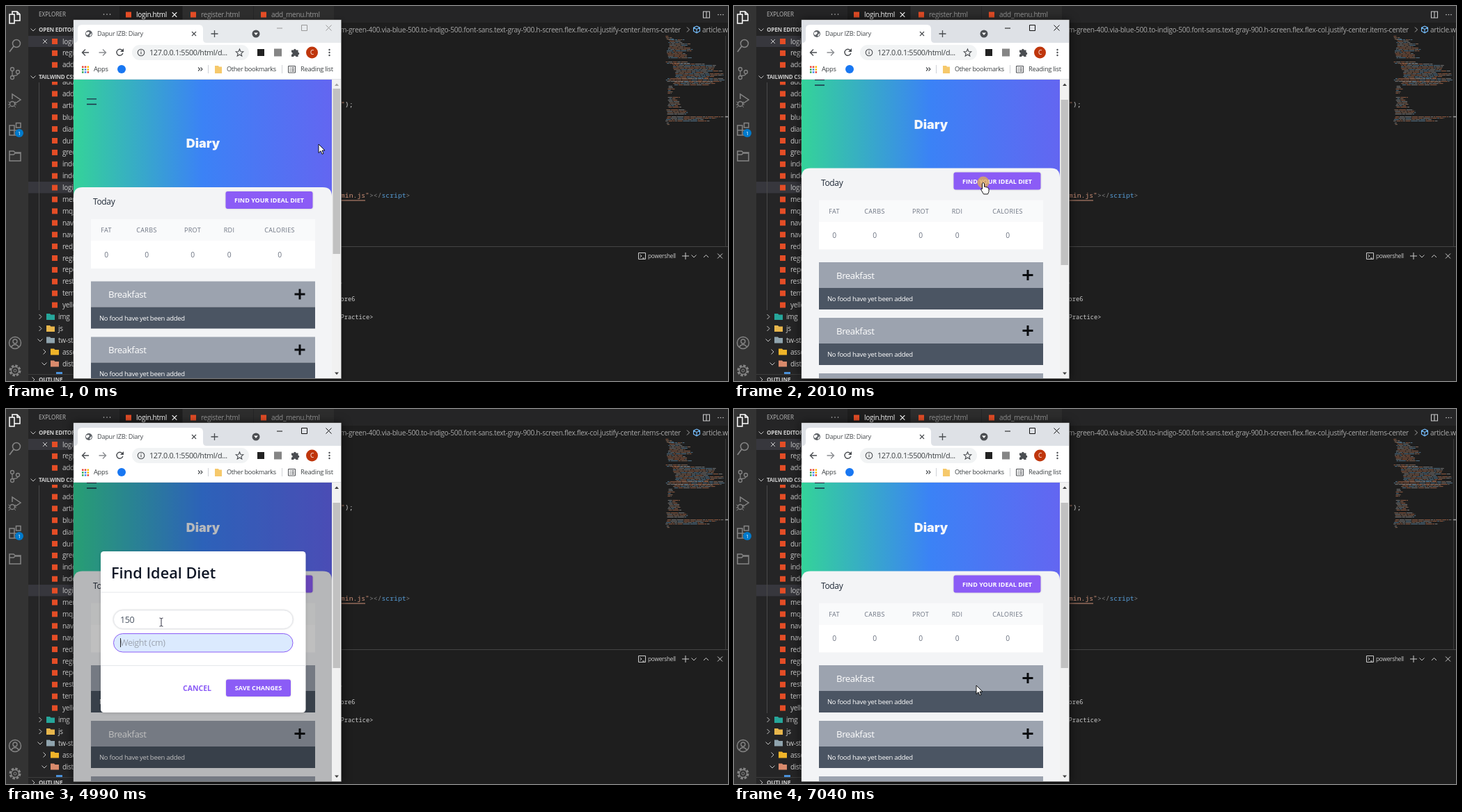
Write an HTML page that moves like this. It is 1037 px wide and 540 px high and loops after 8000 ms.

```html
<!DOCTYPE html>
<html lang="en">
<head>
<meta charset="utf-8">
<title>Diet diary demo</title>
<style>
  html, body { margin: 0; width: 100%; height: 100%; overflow: hidden; background: #1e1e1e; }
  svg { display: block; }
  text { font-family: "Open Sans", "Noto Sans", sans-serif; letter-spacing: -.03em; white-space: pre; }
  .wide { letter-spacing: 0; }
  .head { letter-spacing: .35px; font-weight: 500; }
  .mono { font-family: "Noto Sans Mono", "DejaVu Sans Mono", monospace; letter-spacing: 0; }
  .logo { font-family: Inter, "Open Sans", sans-serif; letter-spacing: 0; font-weight: 900; }
  .lift { filter: drop-shadow(0 .5px 1px rgba(0,0,0,.18)); }
  .modal { filter: drop-shadow(0 1px 2px rgba(0,0,0,.15)); }
</style>
</head>
<body>
<svg id="stage" width="1037" height="540" viewBox="0 0 1037 540">
  <defs>
    <linearGradient id="sky">
      <stop offset="0" stop-color="#34d399"/>
      <stop offset=".5" stop-color="#3b82f6"/>
      <stop offset="1" stop-color="#6366f1"/>
    </linearGradient>
    <clipPath id="view"><rect x="97" y="106" width="371" height="430"/></clipPath>
  </defs>
  <g id="editor"></g>
  <g id="frame"></g>
  <g id="page" clip-path="url(#view)"></g>
  <g id="bar"></g>
  <g id="pointer"></g>
</svg>
<script>
const $ = id => document.getElementById(id);

// Basic shapes; text is placed by the middle of its capitals.
const text = (x, y, s, size, fill, attrs = '') =>
  `<text x="${x}" y="${y + size * .355}" font-size="${size}" fill="${fill}" ${attrs}>${
    s.replace(/</g, '&lt;').replace(/>/g, '&gt;')}</text>`;
const box = (x, y, w, h, fill, attrs = '') =>
  `<rect x="${x}" y="${y}" width="${w}" height="${h}" fill="${fill}" ${attrs}/>`;
const dot = (x, y, r, fill, attrs = '') => `<circle cx="${x}" cy="${y}" r="${r}" fill="${fill}" ${attrs}/>`;
const line = (d, color, width = 1, attrs = '') =>
  `<path d="${d}" fill="none" stroke="${color}" stroke-width="${width}" ${attrs}/>`;
const shape = (d, fill, attrs = '') => `<path d="${d}" fill="${fill}" ${attrs}/>`;
const chevron = (x, y, open, color = '#c5c5c5') =>
  line(open ? `M${x - 3.5} ${y - 1.5}l3.5 3.5 3.5-3.5` : `M${x - 1.5} ${y - 3.5}l3.5 3.5-3.5 3.5`, color);
const cross = (x, y, r, color, width = 1) =>
  line(`M${x - r} ${y - r}l${2 * r} ${2 * r}m0 ${-2 * r}l${-2 * r} ${2 * r}`, color, width);

function rng(seed) {
  return () => (seed = (seed * 16807) % 2147483647) / 2147483647;
}

function activityBar() {
  const g = '#858585', w = '#ffffff';
  let s = box(0, 0, 32, 540, '#333333');
  s += line('M9 12v-4h7l4 4v9h-8M16 8v4h4M5 12h7v13H5z', w, 1.5);
  s += dot(15, 54, 5.5, 'none', `stroke="${g}" stroke-width="1.5"`) + line('M11 58l-6 8', g, 1.7);
  s += [[9, 91], [9, 103], [17, 95]].map(([x, y]) => dot(x, y, 2.5, 'none', `stroke="${g}" stroke-width="1.3"`)).join('');
  s += line('M9 93.500v7M17 97.500q0 3-8 3', g, 1.3);
  s += line('M9 134v-7l12 8-9 6', g, 1.5) + dot(9, 141, 3.5, 'none', `stroke="${g}" stroke-width="1.3"`)
    + line('M3.500 138l2.500 1.500M3 142h2.500M3.500 146l2.500-1.500M12 139l2-1M12.500 142h2.500M12 144l2 2', g);
  s += line('M5 172h7v14H5zM5 179h14v7H5M14.500 168.500h6.500v6.500h-6.500z', g, 1.5);
  s += dot(19, 183, 6, '#007acc') + text(19, 183, '1', 7.5, w, 'text-anchor="middle"');
  s += line('M5 223v-14h6l2 2h8v12zM5 214h6l2-2h8', g, 1.5);
  s += dot(13, 485, 8.5, 'none', `stroke="${g}" stroke-width="1.4"`)
    + dot(13, 483, 3, 'none', `stroke="${g}" stroke-width="1.4"`) + line('M7.500 491q5.500-7 11 0', g, 1.4);
  s += dot(13, 525, 7, 'none', `stroke="${g}" stroke-width="3" stroke-dasharray="3.5 2"`)
    + dot(13, 525, 5.5, 'none', `stroke="${g}" stroke-width="1.3"`) + dot(13, 525, 2, 'none', `stroke="${g}"`);
  return s;
}

const fileMark = (x, y) => box(x - 4, y - 4, 8, 8, '#e44d26');
const folder = (x, y, color) => shape(`M${x - 6} ${y - 4.5}h5l1.500 1.500h5.500v7.500h-12z`, color);

function sidebar() {
  const c = '#cccccc';
  let s = box(32, 0, 131, 540, '#252526');
  s += text(47, 12, 'EXPLORER', 8.1, '#bbbbbb', 'class="wide"');
  s += [140.5, 145, 149.500].map(x => dot(x, 12, .8, c)).join('');
  s += box(32, 43, 131, 16, '#37373d') + box(32, 253, 131, 16.5, '#37373d');
  s += chevron(39, 34, true) + text(47, 34, 'OPEN EDITORS', 8.2, c, 'font-weight="700"');
  s += cross(56, 51, 3, c);
  ['login.html', 'register.html', 'add_menu.html'].forEach((name, i) => {
    const y = 51 + i * 16.9;
    s += fileMark(70, y) + text(81, y, name, 10, c);
  });
  s += line('M47.500 110V438', '#4a4a4a');
  ('add_food add_menu article blue diary dummy green index index_2 login menu mq_test '
    + 'navbar navbar_2 red_page register report rest template yellow').split(' ').forEach((name, i) => {
    const y = 109.500 + i * 16.9;
    s += fileMark(70, y) + text(81, y, name, 10, c);
  });
  s += box(32, 94, 131, 15, '#252526') + chevron(39, 102, true)
    + text(47, 102, 'TAILWIND CSS', 8, c, 'font-weight="700"');
  [[64, 447.5, 'img', 0, '#26a69a'], [64, 464.5, 'js', 0, '#e8b64c'], [64, 481, 'tw-starter', 1, '#90a4ae'],
    [70, 498, 'assets', 0, '#f0b429'], [70, 515, 'dist', 1, '#d98a6c']].forEach(([x, y, name, open, color]) => {
    s += chevron(x - 15, y, open) + folder(x, y, color) + text(x + 11, y, name, 10, c);
  });
  s += box(72, 527, 9, 4, '#4a90d9') + box(32, 530, 131, 10, '#252526') + line('M32 530.500H163', '#3c3c3c');
  return s + chevron(39, 538, false) + text(47, 538.5, 'OUTLINE', 8.2, c, 'font-weight="700"');
}

function minimap() {
  const rand = rng(77), colors = ['#8a8a8a', '#a8694a', '#5f86a0', '#9a7660'];
  const blocks = [
    [43, 48, 947, 5, 12], [48, 60, 951, 15, 32], [60, 76, 949, 22, 38], [80, 83, 947, 30, 50],
    [83, 93, 957, 45, 72], [93, 104, 960, 48, 72], [104, 109, 947, 75, 86], [109, 114, 958, 45, 70],
    [115, 126, 949, 5, 12], [131, 147, 950, 8, 20], [149, 156, 947, 28, 46], [159, 166, 947, 50, 86], [168, 172, 947, 3, 8]];
  let s = '';
  for (const [top, end, x, low, high] of blocks)
    for (let y = top; y < end; y += 2) {
      const stop = Math.min(1032, x + low + rand() * (high - low));
      for (let p = x + rand() * 3; p < stop;) {
        const w = Math.min(stop - p, 2 + rand() * 8);
        s += box(p.toFixed(1), y, w.toFixed(1), 1.1, colors[rand() * 4 | 0], 'opacity=".75"');
        p += w + .8;
      }
    }
  return s;
}

function codeArea() {
  const c = '#cccccc', mono = 'class="mono"', size = 9.75, step = 5.85;
  let s = box(163, 0, 874, 24, '#252526') + box(163, 0, 90, 25, '#1e1e1e')
    + box(254, 0, 101, 24, '#2d2d2d') + box(356, 0, 115, 24, '#2d2d2d');
  [[176, 'login.html', '#ffffff'], [269, 'register.html', '#969696'], [370, 'add_menu.html', '#969696']]
    .forEach(([x, name, color]) => s += fileMark(x, 12.5) + text(x + 11, 12.5, name, 10, color));
  s += cross(242, 12.5, 3.3, '#ffffff', 1.2);
  s += line('M1001.500 8h9v9h-9zM1006 8v9', c, 1.1) + [1023, 1026.5, 1030].map(x => dot(x, 12.5, .8, c)).join('');
  s += text(480, 34, 'm-green-400.via-blue-500.to-indigo-500.font-sans.text-gray-900.h-screen.flex.flex-col.justify-center.items-center',
    10.15, '#a9a9a9');
  s += chevron(979.5, 34, false, '#a9a9a9')
    + line('M992 29l4.500 2.200v5l-4.500 2.600-4.500-2.600v-5zM987.500 31.200l4.500 2.300 4.500-2.300M992 33.500v5', '#75beff', 1.1)
    + text(1000, 34, 'article.w-full', 10.15, '#a9a9a9');
  s += text(481, 142, '"', size, '#ce9178', mono) + text(481 + step, 142, ');', size, '#d4d4d4', mono);
  const run = (n, str, color) => text(481 + n * step, 273, str, size, color, mono);
  s += run(0, 'min.js', '#ce9178') + run(6, '"', '#ce9178') + run(7, '></', '#808080')
    + run(10, 'script', '#569cd6') + run(16, '>', '#808080') + line('M481 280H516', '#ce9178');
  s += minimap() + line('M1033.500 43V346', '#3a3a3a') + line('M1033 159.500h4', '#a0a0a0', 1.5);
  s += line('M163 346.500H1037', '#454545');
  s += line('M908.500 355.500h10v9h-10zM910.500 358l2.500 2-2.500 2M914 363h3', c) + text(922, 360, 'powershell', 8.3, c)
    + line('M971 360h10M976 355v10', c) + chevron(988, 360, true) + line('M1002 362l3.500-3.500 3.500 3.500', c) + cross(1025.5, 360, 3.5, c);
  s += dot(481.5, 399, .8, c) + text(480.5, 422, 'ore6', 8.7, c, mono) + text(480.5, 448, 'Practice>', 8.7, c, mono);
  return s;
}

function browserFrame(active) {
  const dark = '#4a4d51', ctl = active ? '#111111' : '#999999';
  let s = box(97, 20, 384.5, 516.5, '#ffffff', `stroke="#777777" stroke-width=".6" style="filter:drop-shadow(0 1px ${
    active ? 7 : 3}px rgba(0,0,0,${active ? .65 : .4}))"`);
  s += box(97, 20.5, 384, 32.5, active ? '#dee1e6' : '#e7eaed');
  s += shape('M98 53q5 0 5-5V33q0-6 6-6H277q6 0 6 6V48q0 5 5 5z', '#ffffff');
  s += dot(119, 40, 5, '#5f6368') + shape('M115 38l4-1 1 2-3 3-2-1zM120 42l3-3 0 2-2 3z', '#ffffff');
  s += text(131, 40, 'Dapur IZB: Diary', 9.2, '#45494d') + cross(270, 40, 3, dark, 1.2);
  s += line('M294.500 40h10M299.500 35v10', dark, 1.3);
  s += dot(359, 40, 5.5, '#4a4d51') + shape('M356 38.500h6l-3 3.500z', '#ffffff');
  s += line('M389 32h8', ctl) + line('M424.500 27.500h8v8h-8z', ctl) + cross(463.5, 31.5, 4, ctl);

  s += line('M119 67h-9M114 62.500l-4.500 4.500 4.500 4.500', dark, 1.4)
    + line('M133.500 67h9M139 62.500l4.500 4.500-4.500 4.500', '#8a8d91', 1.4)
    + line('M167 64a4.500 4.500 0 1 0 .8 4', dark, 1.4) + shape('M169 61v5h-5z', dark);
  s += box(181, 56, 168, 22, '#f1f3f4', 'rx="11"');
  s += dot(194, 67, 4.8, 'none', `stroke="${dark}" stroke-width="1.1"`) + line('M194 66v3.500M194 63.700v1.300', dark, 1.1);
  s += text(206, 67, '127.0.0.1:5500/html/d...', 10.8, '#3c4043');
  s += line('M335.500 62l1.500 3.500 3.800.3-2.900 2.500.9 3.700-3.300-2-3.300 2 .9-3.700-2.900-2.500 3.800-.3z', dark, 1.1);
  s += box(361, 62, 10, 10, '#222222') + box(385, 61.5, 11, 11, '#858585');
  s += shape('M410 63.500h3.200a1.700 1.700 0 1 1 3.400 0h3v3.300a1.700 1.700 0 1 1 0 3.400v2.800h-3.200a1.600 1.600 0 1 0-3.200 0h-3.200v-3.200a1.600 1.600 0 1 0 0-3.200z', dark);
  s += dot(439.5, 67, 8.5, '#bf360c') + text(439.5, 67, 'C', 8.5, '#ffffff', 'text-anchor="middle"');
  s += [63, 67, 71].map(y => dot(464.5, y, 1.2, dark)).join('');

  ['#ea4335', '#ea4335', '#fbbc04', '#34a853', '#4285f4', '#fbbc04', '#34a853', '#4285f4', '#ea4335']
    .forEach((color, i) => s += box(109 + i % 3 * 3.8, 86.5 + (i / 3 | 0) * 3.8, 2.5, 2.5, color));
  s += text(126, 91, 'Apps', 9.3, '#3c4043') + dot(166, 91, 6, '#1877f2');
  s += line('M276 88.500l2.500 2.500-2.500 2.500M279.500 88.500l2.500 2.500-2.500 2.500', dark, 1.1) + line('M290.500 85v12', '#d0d3d7');
  s += shape('M300 86h5l1 1.500h4V97h-10z', '#f6c96b') + text(317, 91, 'Other bookmarks', 9.15, '#3c4043');
  s += line('M396.500 85v12', '#d0d3d7') + line('M405.500 86.500h10v9.500h-10zM407.500 89h1.500m1 0h4M407.500 91.300h1.500m1 0h4M407.500 93.600h1.500m1 0h4', dark);
  return s + text(423, 91, 'Reading list', 9.35, '#3c4043') + line('M97 105.500H481', '#dfe1e5');
}

function meal(y) {
  return box(122, y, 322, 37, '#9ca3af') + box(122, y + 37, 322, 31, '#4b5563')
    + text(147, y + 19, 'Breakfast', 13.2, '#ffffff')
    + line(`M414.500 ${y + 18.5}h15M422 ${y + 11}v15`, '#0b0d10', 3)
    + text(134, y + 53, 'No food have yet been added', 9.48, '#ffffff');
}

function diary(scroll) {
  let s = box(97, 90, 371, 200, 'url(#sky)');
  s += line('M116 133.800h14M116 141.500h14', '#1f2f45', 1.3);
  s += text(283, 198, 'Diary', 18, '#f3f6fb', 'class="logo" text-anchor="middle"');
  s += shape('M97 600V274q0-13 13-13H455q13 0 13 13V600z', '#f3f4f6');
  s += text(125, 282, 'Today', 12, '#1f2937');
  s += box(315.5, 267, 125, 25, '#8b5cf6', 'rx="3" class="lift"');
  s += text(378, 280, 'FIND YOUR IDEAL DIET', 9, '#ffffff', 'class="wide" font-weight="700" text-anchor="middle"');
  s += box(122, 307, 322, 31, '#f9fafb') + box(122, 338, 322, 40, '#ffffff');
  [['FAT', 144], ['CARBS', 202], ['PROT', 268], ['RDI', 320.5], ['CALORIES', 393]].forEach(([name, x]) => {
    s += text(x, 323, name, 9, '#6b7280', 'class="head" text-anchor="middle"');
    s += text(x, 358, '0', 10.3, '#6b7280', 'text-anchor="middle"');
  });
  s += [396.5, 476.5, 556.5].map(meal).join('');
  return `<g transform="translate(0 ${-scroll})">${s}</g>`;
}

function field(y, value, color, focus) {
  return box(154.5, y + .5, 257.5, 26.5, focus ? '#dbeafe' : '#ffffff',
    `rx="13.2" stroke="${focus ? '#8b5cf6' : '#e5e7eb'}" class="${focus ? '' : 'lift'}"`)
    + text(164, y + 14, value, 12.5, color) + (focus ? line(`M164.500 ${y + 7}v13`, '#222222') : '');
}

const HINT = '#9ca3af';
function dialog({ height, weight, focus, typed }) {
  let s = box(97, 106, 371, 430, '#000000', 'opacity=".25"');
  s += box(136, 205, 294.5, 232, '#ffffff', 'rx="4.5" class="modal"');
  s += text(151, 236, 'Find Ideal Diet', 21.7, '#111827', 'class="wide" font-weight="600"');
  s += line('M136 264H430.500M136 369.500H430.500', '#e5e7eb');
  s += field(289.3, height, typed ? '#4b5563' : HINT, focus === 'height');
  s += field(323, weight, weight === '50' ? '#b0b4ba' : HINT, focus === 'weight');
  if (focus === 'height')
    s += box(153.5, 318, 259, 39.5, '#ffffff', 'rx="2" class="lift"') + text(163, 338, 'asdaddasds', 10.1, '#1f2937');
  s += text(274.5, 402, 'CANCEL', 10.5, '#8b5cf6', 'class="wide" font-weight="700" text-anchor="middle"');
  s += box(316, 389.5, 93, 24.5, '#8b5cf6', 'rx="3" class="lift"');
  return s + text(362.5, 402, 'SAVE CHANGES', 9.1, '#ffffff', 'class="wide" font-weight="700" text-anchor="middle"');
}

function scrollbar(scroll) {
  const top = scroll ? 135 : 119;
  return box(468, 106, 13, 430, '#f1f1f1') + box(469.5, top, 10.5, 238, '#c1c1c1')
    + shape('M472 115h6l-3-3.500z', scroll ? '#404040' : '#a3a3a3') + shape('M472 527.500h6l-3 3.500z', '#404040');
}

const pointers = {
  arrow: () => shape('M0 0v12.500l3-2.800 2 4.600 2-.9-2-4.400h4z', '#ffffff', 'stroke="#000000" stroke-width=".9"'),
  hand: () => dot(0, 0, 8.5, '#e3b14f', 'opacity=".75"')
    + shape('M-1.500 1.500q1.500-2 3 0v5l1-.5 1.500 1 1.500-.3 1 1.200q1.500 0 1.500 1.500v4l-1.500 3.500h-6l-3.500-6q-1-2.500 1.500-1.500z', '#ffffff', 'stroke="#000000" stroke-width=".9"'),
  beam: () => line('M-2.500-6q2 0 2.500 1 .5-1 2.500-1M0-5V5M-2.500 6q2 0 2.500-1 .5 1 2.500 1', '#333344')
};

const LOOP = 8000, DOWN = 27.5;
const empty = { height: 'Height (cm)', weight: 'Weight (cm)' };
const steps = [
  { at: 0, active: false, scroll: 0, cursor: ['arrow', 449, 199] },
  { at: 1000, active: true, scroll: 0, cursor: ['arrow', 449, 199] },
  { at: 2010, active: true, scroll: DOWN, cursor: ['hand', 358, 254] },
  { at: 2990, active: true, scroll: DOWN, cursor: ['beam', 246.5, 298], form: empty },
  { at: 4010, active: true, scroll: DOWN, cursor: ['beam', 223, 307], form: { ...empty, focus: 'height' } },
  { at: 4990, active: true, scroll: DOWN, cursor: ['beam', 223, 307], form: { ...empty, height: '150', typed: true, focus: 'weight' } },
  { at: 5990, active: true, scroll: DOWN, cursor: ['beam', 223, 307], form: { height: '150', weight: '50', typed: true } },
  { at: 7040, active: true, scroll: DOWN, cursor: ['arrow', 348, 398] }
];

function show({ active, scroll, cursor: [kind, x, y], form }) {
  $('frame').innerHTML = browserFrame(active);
  $('page').innerHTML = diary(scroll) + (form ? dialog(form) : '');
  $('bar').innerHTML = scrollbar(scroll);
  $('pointer').innerHTML = `<g transform="translate(${x} ${y})">${pointers[kind]()}</g>`;
}

$('editor').innerHTML = codeArea() + sidebar() + activityBar();
const start = performance.now();
let current;
function tick() {
  const t = (performance.now() - start) % LOOP;
  const step = steps.findLast(s => s.at <= t) || steps[0];
  if (step !== current) show(current = step);
  requestAnimationFrame(tick);
}
tick();
</script>
</body>
</html>
```
